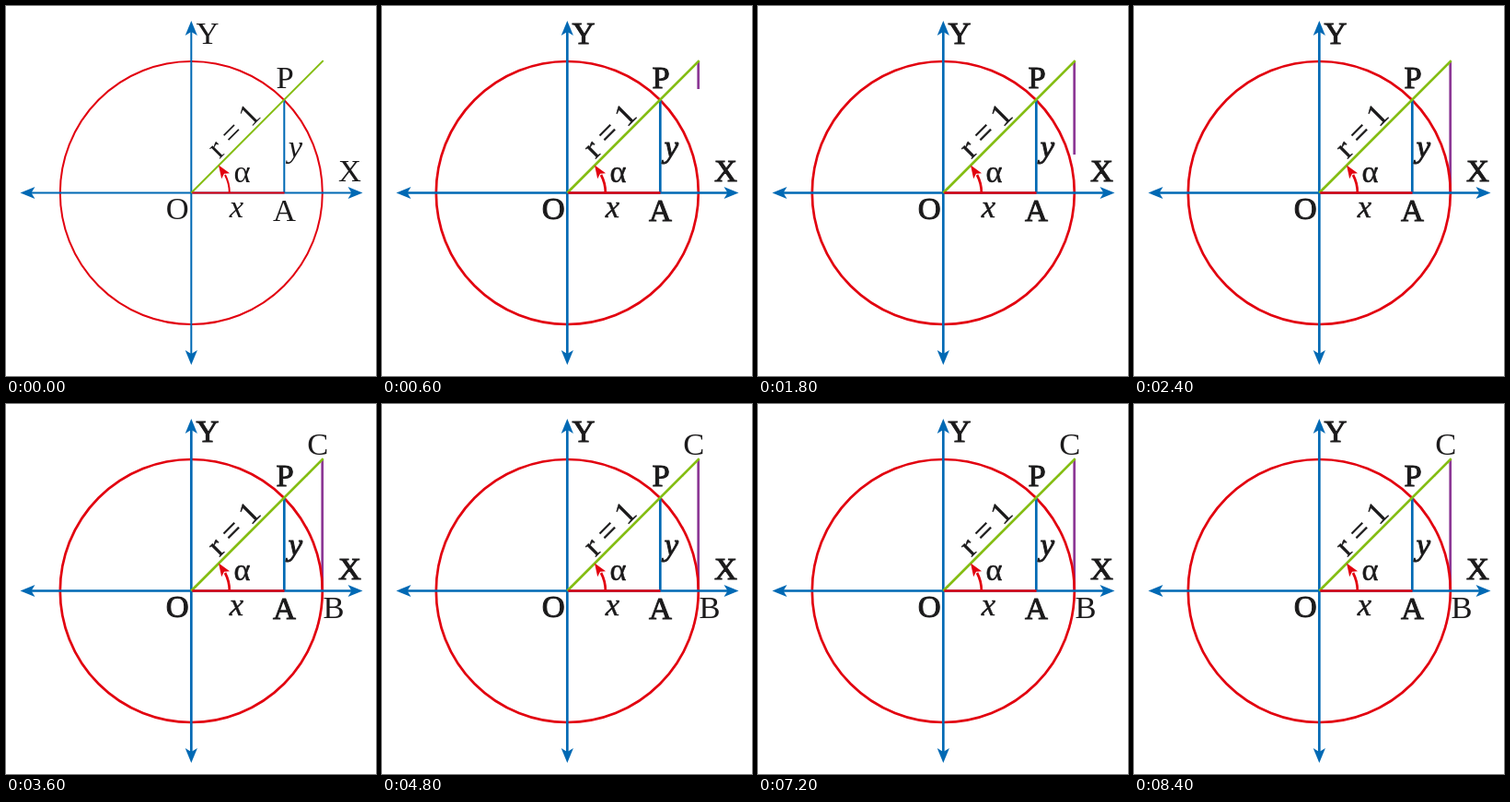
Recreate the animation shown at these times as an HTML page. Size 402 by 401 pixels, loop 9.4 s.

```html
<!DOCTYPE html>
<html lang="en">
<head>
<meta charset="utf-8">
<title>Unit circle</title>
<style>
  html, body { margin: 0; width: 100%; height: 100%; overflow: hidden; background: #fff; }
  svg { display: block; width: 100%; height: 100%; }
  text { font: 34.5px "Liberation Serif", "Times New Roman", serif; fill: #1b1a1b; stroke: #1b1a1b; stroke-width: 0; text-anchor: middle; }
  .it { font-style: italic; }
  .blue { stroke: #0069b4; }
  .red { stroke: #e2000f; }
  .green { stroke: #84bd12; }
  .purple { stroke: #8c3795; }
  .line { fill: none; stroke-width: 2; }
  .heads { fill: #0069b4; }
  .bold .line { stroke-width: 2.7; }
  .bold .label { stroke-width: 1; }
  .bold .thin { stroke-width: .45; }
</style>
</head>
<body>
<svg viewBox="0 0 402 401">
  <defs><path id="head" d="M0 0L-16 -6.6L-12 0L-16 6.6Z"/></defs>
  <g id="figure">
    <path id="tangent" class="line purple"/>
    <circle class="line red" cx="201.3" cy="202.5" r="142.5"/>
    <path class="line blue" d="M26 202.5H377M201.3 26V378M302.3 101.5V202.5"/>
    <g class="heads">
      <use href="#head" transform="translate(387.5 202.5)"/>
      <use href="#head" transform="translate(15.5 202.5) rotate(180)"/>
      <use href="#head" transform="translate(201.3 16) rotate(-90)"/>
      <use href="#head" transform="translate(201.3 389) rotate(90)"/>
    </g>
    <path class="line green" d="M201.3 202.5L344.7 59.1"/>
    <path class="line red" d="M202.3 202.5H302.5M242.8 202.5A41.5 41.5 0 0 0 238 183"/>
    <path fill="#e2000f" d="M0 0L-14 -5.3L-11 0L-14 5.3Z" transform="translate(231 172.5) rotate(-123)"/>
    <text class="label" x="219" y="41">Y</text>
    <text class="label" x="373.5" y="190">X</text>
    <text class="label" x="303" y="89">P</text>
    <text class="label" x="302.5" y="233">A</text>
    <text class="label" x="186.3" y="231">O</text>
    <text class="label it" x="314.5" y="164">y</text>
    <text class="thin it" x="250.5" y="228.5">x</text>
    <text class="thin" x="256.5" y="190.5">α</text>
    <text class="thin" transform="translate(255 143) rotate(-45)">r = 1</text>
    <text id="b" x="356" y="232">B</text>
    <text id="c" x="338.7" y="55">C</text>
  </g>
</svg>
<script>
  const LOOP = 9400, STEP = 600;
  const ends = [0, 90, 119, 161, 202.5];
  const get = id => document.getElementById(id);
  const show = (id, on) => get(id).setAttribute("visibility", on ? "visible" : "hidden");

  function draw(time) {
    const step = Math.floor(time % LOOP / STEP);
    get("figure").setAttribute("class", step ? "bold" : "");
    const end = ends[Math.min(step, ends.length - 1)];
    get("tangent").setAttribute("d", end ? `M343.7 60V${end}` : "");
    show("b", step >= 5);
    show("c", step >= 6);
  }

  const start = performance.now();
  function tick() {
    draw(performance.now() - start);
    requestAnimationFrame(tick);
  }
  tick();
</script>
</body>
</html>
```
